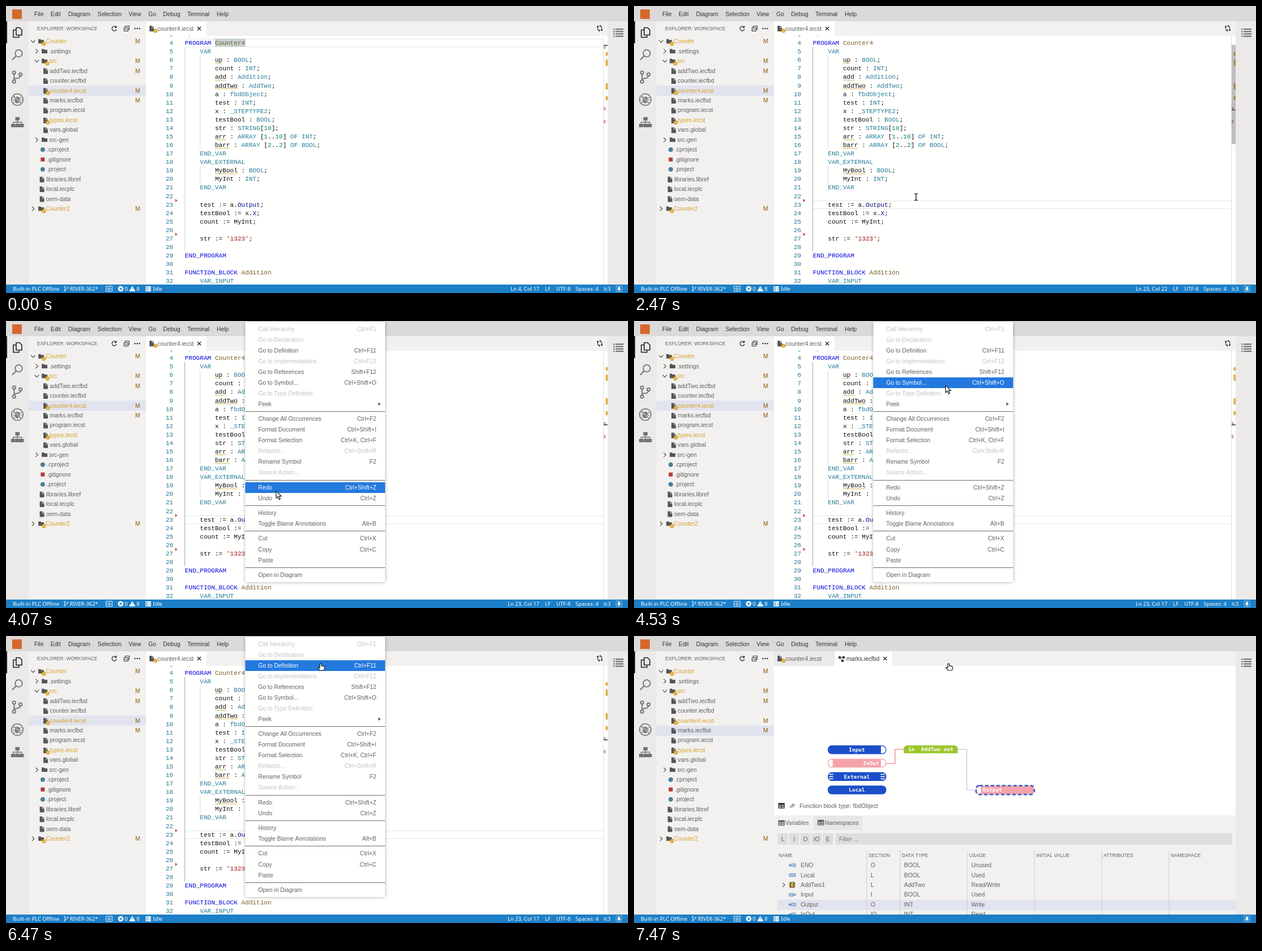
An HTML page with a canvas that plays this animation: 1101x509 px, repeating every 8 s.

```html
<!DOCTYPE html>
<html lang="en">
<head>
<meta charset="utf-8">
<title>Code editor: go to definition</title>
<style>
html, body { margin: 0; width: 100%; height: 100%; overflow: hidden; background: #fffffe; }
canvas { display: block; }
</style>
</head>
<body>
<canvas id="stage" width="1101" height="509"></canvas>
<script>
const ctx = document.getElementById('stage').getContext('2d');
const LOOP = 8000;
const SANS = '"Liberation Sans", Arial, sans-serif';
const CODE = '11.11px "Liberation Mono", monospace';
const UI = '10.32px ' + SANS;
const SMALL = '8.6px ' + SANS;
const STATUS = '9.4px "Noto Sans", "Open Sans", sans-serif';
const NODE = 'bold 9.52px "DejaVu Sans Mono", monospace';
const CHAR = 6.667, LINE = 15.08, ROW = 17.46, CODE_X = 316.6;
const GREY = '#616161', DARK = '#333', GOLD = '#d6a12a', BROWN = '#895503';
const PANEL = '#f2f1f0', BAR = '#ebeae9', SELECTED = '#e1e4ee', WHITE = '#fffffe';

// Drawing helpers
function rect(x, y, w, h, color) {
  ctx.fillStyle = color;
  ctx.fillRect(x, y, w, h);
}
function text(s, x, y, color = GREY, font = UI, align = 'left') {
  ctx.font = font;
  ctx.fillStyle = color;
  ctx.textAlign = align;
  ctx.fillText(s, x, y + parseFloat(font.replace('bold ', '')) * 0.345);
}
function fill(d, x, y, color) {
  ctx.save();
  ctx.translate(x, y);
  ctx.fillStyle = color;
  ctx.fill(new Path2D(d));
  ctx.restore();
}
function stroke(d, x, y, color, width = 1) {
  ctx.save();
  ctx.translate(x, y);
  ctx.strokeStyle = color;
  ctx.lineWidth = width;
  ctx.stroke(new Path2D(d));
  ctx.restore();
}
function disc(x, y, r, color) {
  ctx.fillStyle = color;
  ctx.beginPath();
  ctx.arc(x, y, r, 0, 7);
  ctx.fill();
}
function ring(x, y, r, color, width = 1) {
  ctx.strokeStyle = color;
  ctx.lineWidth = width;
  ctx.beginPath();
  ctx.arc(x, y, r, 0, 7);
  ctx.stroke();
}
function round(x, y, w, h, r, color) {
  ctx.fillStyle = color;
  ctx.beginPath();
  ctx.roundRect(x, y, w, h, r);
  ctx.fill();
}
function shadowBox(x, y, w, h, color) {
  ctx.save();
  ctx.shadowColor = 'rgba(0,0,0,.35)';
  ctx.shadowBlur = 6;
  rect(x, y, w, h, color);
  ctx.restore();
}
function clipped(x, y, w, h, draw) {
  ctx.save();
  ctx.beginPath();
  ctx.rect(x, y, w, h);
  ctx.clip();
  draw();
  ctx.restore();
}

// Icons
const cross = (x, y) => stroke('M-3-3L3 3M3-3L-3 3', x, y, '#222', 1.4);
function fileIcon(x, y) {
  fill('M-4-5h5l3 3v7h-8z', x, y, '#555');
  stroke('M.7-5v3.3h3.3', x, y, '#eee', .8);
}
const folderIcon = (x, y) => fill('M-5-4h4l1.3 1.5h4.7v6.3h-10z', x, y, '#555');
function badge(x, y) {
  disc(x, y, 3.6, '#dda526');
  stroke('M-1.5 0l1 1.3L1.6-1.4', x, y, '#fff4d8', .9);
}
function chevron(x, y, open) {
  stroke(open ? 'M-3.8-2L0 2L3.8-2' : 'M-2-3.8L2 0L-2 3.8', x, y, '#444', 1.1);
}
function infoIcon(x, y) {
  disc(x, y, 5.4, '#76bdec');
  rect(x - .7, y - .8, 1.5, 3.8, '#fff');
  rect(x - .7, y - 3.2, 1.5, 1.4, '#fff');
}
function branchIcon(x, y, s, color) {
  for (const [dx, dy] of [[-3, -4.2], [3, -2.5], [-3, 4.2]]) ring(x + dx * s, y + dy * s, 1.4 * s, color, s);
  stroke(`M${-3 * s} ${-2.6 * s}V${2.6 * s}M${3 * s}${-1 * s}Q${3 * s} ${1.4 * s} ${-3 * s} ${1.6 * s}`, x, y, color, s);
}
function tableIcon(x, y, color) {
  stroke('M-5-4.2h10v8.4h-10zM-5-1.4h10M-5 1.4h10M0-3v7', x, y, color, 1.2);
  rect(x - 5, y - 4.5, 10, 2, color);
}
function eraserIcon(x, y) {
  fill('M-5 1.5L1-4.5L5-1L-.5 4h-3z', x, y, '#aaa');
  stroke('M-2.5-1L1.5 3M-3 4h8', x, y, '#fff', .9);
}

// Window frame
function titleBar() {
  rect(0, 0, 1101, 27, '#dbdad9');
  rect(11, 6, 17, 17, '#d5682e');
  const items = { File: 50, Edit: 79, Diagram: 110, Selection: 162, View: 217, Go: 252, Debug: 278, Terminal: 321, Help: 373 };
  for (const name in items) text(name, items[name], 14, DARK);
}
function activityBar() {
  const c = '#727272';
  rect(0, 27, 40, 467, BAR);
  rect(0, 27, 2, 39, '#222');
  stroke('M-2-8h6l4 4v9h-10zM-2-4h-5v13h10v-3', 20, 46.5, '#1e1e1e', 1.6);
  ring(22.5, 84, 6.3, c, 1.8);
  stroke('M0 0L-7 7', 18, 88.5, c, 2.2);
  branchIcon(20, 126, 1.9, c);
  ring(20, 166, 10.2, c, 1.6);
  fill('M-4-3Q0-9 4-3V3Q0 9-4 3z', 20, 166.5, c);
  stroke('M-7-4l3 2M7-4l-3 2M-8 1h16M-7 6l3-2M7 6l-3-2', 20, 166, c, 1.2);
  stroke('M-7-7L7 7', 20, 166, BAR, 3);
  stroke('M-7-7L7 7', 20, 166, c, 1.5);
  for (const [x, y] of [[16.5, 197], [9, 209], [16.5, 209], [24, 209]]) rect(x, y, 7.5, 6, c);
  stroke('M0-5v9M-7.5 4V0h15v4', 20.2, 206, c, 1.3);
  rect(1065, 27, 36, 467, BAR);
  for (let i = 0; i < 4; i++) {
    rect(1075, 40 + i * 4.2, 2.5, 2.2, c);
    rect(1079, 40 + i * 4.2, 14, 2.2, c);
  }
}

// Rows: name, text x, kind, flags (w = warning, m = modified)
const TREE = [
  ['Counter', 70.5, 'open', 'wm'], ['.settings', 76.5, 'closed', ''], ['src', 76.5, 'open', 'wm'],
  ['addTwo.iecfbd', 77.5, 'file', 'm'], ['counter.iecfbd', 77.5, 'file', ''], ['counter4.iecst', 77.5, 'file', 'wm'],
  ['marks.iecfbd', 77.5, 'file', 'm'], ['program.iecst', 77.5, 'file', ''], ['types.iecst', 77.5, 'file', 'w'],
  ['vars.global', 77.5, 'file', ''], ['src-gen', 76.5, 'closed', ''], ['.cproject', 72.5, 'disc', ''],
  ['.gitignore', 72.5, 'square', ''], ['.project', 72.5, 'disc', ''], ['libraries.libref', 71, 'file', ''],
  ['local.iecplc', 71, 'file', ''], ['oem-data', 71, 'file', ''], ['Counter2', 70.5, 'closed', 'wm']
];
function sidebar(active) {
  rect(40, 27, 208, 467, PANEL);
  text('EXPLORER: WORKSPACE', 55, 40, GREY, SMALL);
  stroke('M3.2-2.6A4 4 0 1 0 4 1M3.8-5v3h-3', 191.5, 40, DARK, 1.3);
  stroke('M-4-1.5h7v6h-7zM-2-2v-2.5h7v6h-2M-2.5 1.5h4', 213, 40, DARK, 1.1);
  for (let i = 0; i < 3; i++) disc(228.3 + i * 4, 40, 1.3, DARK);
  TREE.forEach(([name, x, kind, flags], i) => {
    const y = 62.7 + i * ROW, warn = flags.includes('w');
    if (name === active) rect(40, Math.round(y - 8.7), 207, 18, SELECTED);
    if (kind === 'file') fileIcon(x - 7.3, y + .5);
    else if (kind === 'disc') disc(65, y, 4, '#4a7f96');
    else if (kind === 'square') rect(61.5, y - 3.5, 7, 7, '#ad3d38');
    else {
      folderIcon(x - 8.3, y);
      chevron(x > 75 ? 54.5 : 48, y, kind === 'open');
    }
    if (warn) badge(x - 3.4, y + 4.2);
    text(name, x, y, warn ? GOLD : GREY);
    if (flags.includes('m')) text('M', 233, y, BROWN, UI, 'center');
  });
}
function statusBar(position, notices) {
  const put = (s, x, align) => text(s, x, 501.6, '#fff', STATUS, align);
  rect(0, 494, 1101, 15, '#1c7fc7');
  put('Built-in PLC Offline', 12);
  branchIcon(106.5, 501.5, .8, '#fff');
  put('RIVER-362*', 113);
  stroke('M-5.5-4.5h11v9h-11zM-2.5 1.5Q-5 0-2-1Q0-4 2-1Q5 0 2.5 1.5M0 4V0M-1.5 1.3L0 0L1.5 1.3', 182.5, 501.5, '#fff', .9);
  disc(203, 501.5, 4.8, '#fff');
  stroke('M-2-2L2 2M2-2L-2 2', 203, 501.5, '#1c7fc7', 1.3);
  put('0', 210);
  fill('M0-5L5.5 4.5h-11z', 223.5, 501.5, '#fff');
  rect(223, 499.5, 1, 3.2, '#1c7fc7');
  put('8', 231);
  for (let i = 0; i < 3; i++) rect(247, 497 + i * 3.3, 9.5, 2.6, '#fff');
  rect(249, 497, .8, 9, '#1c7fc7');
  put('Idle', 260);
  if (position) {
    put(position, 944, 'right');
    put('LF', 954);
    put('UTF-8', 974);
    put('Spaces: 4', 1008);
    put('lc3', 1058);
  }
  const x = notices ? 1079.5 : 1085;
  stroke('M-5-5h10v10h-10z', x, 501.5, '#a9cfeb', .8);
  fill('M-3.5 2Q-2 1-2-1Q-2-3.7 0-3.7Q2-3.7 2-1Q2 1 3.5 2zM-1 2.7h2v1h-2z', x, 501.5, '#fff');
  if (notices) put('1', 1088);
}
function tabs(diagram) {
  rect(248, 27, 817, 26, PANEL);
  rect(248, 27, 107, 26, diagram ? BAR : WHITE);
  fileIcon(258, 40);
  badge(264.5, 44);
  text('counter4.iecst', 268, 40);
  if (!diagram) {
    cross(342, 40);
    stroke('M-3.5-2v3Q-3.5 4 0 4M3.5 2v-3Q3.5-4 0-4M1.5-5.5L0-4L1.5-2.5M-1.5 2.5L0 4L-1.5 5.5', 1051, 39.5, DARK, 1.2);
    disc(1047.5, 36.5, 1.6, DARK);
    disc(1054.5, 42.5, 1.6, DARK);
    return;
  }
  rect(355.5, 27, 101.5, 26, WHITE);
  rect(362, 36, 4, 4, DARK);
  rect(369, 36, 4, 4, DARK);
  rect(367, 42, 4, 4, DARK);
  stroke('M-3-2H3M-2-1L2 4', 367, 40, DARK, 1);
  text('marks.iecfbd', 376, 40, DARK);
  cross(444.5, 40);
}

// Code editor
const SOURCE = `*/
PROGRAM Counter4
    VAR
        up : BOOL;
        count : INT;
        add : Addition;
        addTwo : AddTwo;
        a : fbdObject;
        test : INT;
        x : _STEPTYPE2;
        testBool : BOOL;
        str : STRING[10];
        arr : ARRAY [1..10] OF INT;
        barr : ARRAY [2..2] OF BOOL;
    END_VAR
    VAR_EXTERNAL
        MyBool : BOOL;
        MyInt : INT;
    END_VAR

    test := a.Output;
    testBool := x.X;
    count := MyInt;

    str := '1323';

END_PROGRAM

FUNCTION_BLOCK Addition
    VAR_INPUT`.split('\n');
const TOKEN = /'[^']*'|(?<=\.)[A-Za-z]\w*|\w+|[^\s\w]/g;
const MARKED = /^ +(up|add|addTwo|arr|barr|MyBool) :/;
const lineY = n => 65.3 + (n - 4) * LINE;

function tokenColor(word, line, at) {
  if (/^((END_)?PROGRAM|FUNCTION_BLOCK)$/.test(word)) return '#0808e0';
  if (word[0] === "'") return '#a31515';
  if (/^\d+$/.test(word)) return '#098658';
  if (line[at - 1] === '.' && /^[A-Z]/.test(word)) return '#001080';
  if (/^(PROGRAM|FUNCTION)/.test(line)) return '#795e26';
  if (/^(VAR|END_VAR)/.test(word)) return '#267f99';
  return /: /.test(line.slice(0, at)) && /\w/.test(word) ? '#267f99' : '#111';
}
function squiggle(x, y, w) {
  let d = 'M0 0';
  for (let i = 1; i * 2 <= w; i++) d += `L${i * 2} ${i % 2 ? -2 : 0}`;
  stroke(d, x, y, '#c99a2c', .9);
}
function code(current) {
  const top = Math.round(lineY(current) - LINE / 2 + .4);
  rect(CODE_X, top, 741, 1, '#e4e4e3');
  rect(CODE_X, top + 14, 741, 1, '#e4e4e3');
  if (current === 4) rect(370, 58, 54, 14, '#c7d2d4');
  rect(316, lineY(5) - 7.5, 1, LINE * 24, current === 4 ? '#d6d6d5' : '#a5a5a4');
  rect(343, lineY(6) - 7.5, 1, LINE * 11, '#d6d6d5');
  rect(343, lineY(19) - 7.5, 1, LINE * 2, '#d6d6d5');
  SOURCE.forEach((line, i) => {
    const y = lineY(i + 3);
    text(i + 3, 296, y, '#237893', CODE, 'right');
    for (const m of line.matchAll(TOKEN)) {
      text(m[0], CODE_X + m.index * CHAR, y, i ? tokenColor(m[0], line, m.index) : '#008000', CODE);
    }
    const mark = line.match(MARKED);
    if (mark) squiggle(370, y + 7, mark[1].length * CHAR);
  });
  for (const y of [345, 405]) fill('M-1.5-3L2.5 0L-1.5 3z', 301, y, '#cf4747');
}
function ruler(current, sliderAlpha) {
  rect(1057, 53, 1, 441, '#dddddc');
  if (current === 4) rect(1058, 71, 3.5, 5, '#b9b7b9');
  for (const [y, h] of [[82, 6], [95, 11], [137, 11], [160, 7]]) rect(1061.5, y, 3.5, h, '#e0ac3c');
  for (const y of [179, 202]) rect(1058, y, 3.5, 6, '#d6a5ab');
  rect(1058, current === 4 ? 69 : 183.5, 7, 1.5, '#3a3340');
  rect(1058, 69, 7, 176, `rgba(100,100,100,${.42 * sliderAlpha})`);
}
function editor(t) {
  const current = t < 1600 ? 4 : 23;
  rect(248, 53, 817, 441, WHITE);
  clipped(248, 52, 809, 442, () => code(current));
  ruler(current, t < 2000 ? ramp(t, 470, 600) : 1 - ramp(t, 3270, 4070));
  if ((t >= 1600 && t < 2130) || (t >= 2670 && t < 3270)) rect(456.3, 345, 1.6, 15, '#111');
}

// Context menu; "-" is a separator, a leading "!" marks a disabled entry
const MENU = `!Call Hierarchy|Ctrl+F1
!Go to Declaration|
Go to Definition|Ctrl+F11
!Go to Implementations|Ctrl+F12
Go to References|Shift+F12
Go to Symbol...|Ctrl+Shift+O
!Go to Type Definition|
Peek|>
-
Change All Occurrences|Ctrl+F2
Format Document|Ctrl+Shift+I
Format Selection|Ctrl+K, Ctrl+F
!Refactor...|Ctrl+Shift+R
Rename Symbol|F2
!Source Action...|
-
Redo|Ctrl+Shift+Z
Undo|Ctrl+Z
-
History|
Toggle Blame Annotations|Alt+B
-
Cut|Ctrl+X
Copy|Ctrl+C
Paste|
-
Open in Diagram|`.split('\n');
function menu(pointer) {
  shadowBox(423.5, 1.5, 247.5, 461.5, WHITE);
  let y = 14;
  for (const entry of MENU) {
    if (entry === '-') {
      rect(423.5, Math.round(y - 6.3), 247.5, 1, '#6c6c6c');
      y += 7.25;
      continue;
    }
    const off = entry[0] === '!';
    const [label, keys] = entry.replace('!', '').split('|');
    const over = !off && pointer.x > 425 && Math.abs(pointer.y - y) < 9.5;
    if (over) rect(423.5, Math.round(y - 9.3), 247.5, 19, '#2479df');
    const color = over ? '#fff' : off ? '#c2c2c2' : GREY;
    text(label, 446.5, y, color);
    if (keys === '>') fill('M-2-3L2.5 0L-2 3z', 661, y, color);
    else text(keys, 655.5, y, color, UI, 'right');
    y += 19.05;
  }
}

// Diagram editor
const BLUE = '#1b4fc8', PINK = '#f5a3aa';
function pill(y, color, label, x, left, right) {
  round(343, y, 103.5, 15.5, 7, color);
  if (left) round(344.2, y + 1.2, 7.5, 13.1, [6, 0, 0, 6], '#fff');
  if (right) round(437.2, y + 1.2, 8, 13.1, [0, 6, 6, 0], '#fff');
  text(label, x, y + 7.8, '#fff', NODE, 'center');
}
function diagram(selected) {
  stroke('M446 226H462V201H478', 0, 0, '#ee9ba4', 1.6);
  stroke('M573 201H589V273H606', 0, 0, '#cfd3ea', 1.6);
  pill(194, BLUE, 'Input', 394.5, false, true);
  pill(217.8, PINK, 'InOut', 419.5, true, true);
  pill(241.5, BLUE, 'External', 394.5);
  for (const x of [345, 436.5]) for (let i = 0; i < 3; i++) rect(x, 244.5 + i * 4, 7.5, 1.6, '#fff');
  pill(265.3, BLUE, 'Local', 394.5);
  round(477.5, 194, 95.5, 14, [6, 6, 0, 0], '#9bc62c');
  text('in  AddTwo out', 525.3, 201, '#fff', NODE, 'center');
  round(605.5, 265.5, 103, 15.5, 6, PINK);
  round(606.5, 267, 7.5, 12.5, [5, 0, 0, 5], '#fff');
  text('Output', 617, 273, '#fff', NODE);
  if (selected) {
    ctx.setLineDash([6, 4]);
    ctx.strokeStyle = '#3d5fcf';
    ctx.lineWidth = 2.8;
    ctx.beginPath();
    ctx.roundRect(605.5, 265.3, 103, 15.9, 6);
    ctx.stroke();
    ctx.setLineDash([]);
  }
}
const COLUMNS = { NAME: 256, SECTION: 415, 'DATA TYPE': 474, USAGE: 593, 'INITIAL VALUE': 712, ATTRIBUTES: 831, NAMESPACE: 950 };
const VARIABLES = [
  ['ENO', 'O', 'BOOL', 'Unused'], ['Local', 'L', 'BOOL', 'Used'], ['AddTwo1', 'L', 'AddTwo', 'Read/Write'],
  ['Input', 'I', 'BOOL', 'Used'], ['Output', 'O', 'INT', 'Write'], ['InOut', 'IO', 'INT', 'Read']
];
function variableIcon(row, y) {
  if (row[2] === 'AddTwo') {
    chevron(265, y, false);
    stroke('M-6-3h12M-6 0h12M-6 3h12', 280, y, '#6b5a2c', 1);
    rect(276, y - 5, 8, 10, '#6b5420');
    rect(278, y - 3.5, 4, 7, '#e6c766');
    rect(279, y - .6, 3, 1.2, '#6b5420');
    return;
  }
  const input = row[1] === 'I', local = row[1] === 'L';
  const x = input ? 274.5 : local ? 275 : 278.5, w = local ? 11 : 7.5;
  rect(x, y - 2.5, w, 5, '#a9c6ee');
  stroke(`M0 0h${w}v5h${-w}z`, x, y - 2.5, '#6787b8', .9);
  if (!local) stroke(input ? 'M0 0h4M2-2L4.5 0L2 2' : 'M0 0h-4M-2-2L-4.5 0L-2 2', input ? 282 : 278.5, y, '#4a5f80', 1);
}
function variables(filled, selected) {
  rect(248, 318, 817, 176, PANEL);
  rect(318, 319, 86, 25, '#e7e6e5');
  tableIcon(261, 331.5, '#555');
  text('Variables', 267.5, 331.5);
  tableIcon(330.5, 331, '#555');
  text('Namespaces', 337.5, 331);
  ['L', 'I', 'O', 'IO', 'E'].forEach((s, i) => {
    const x = 254.5 + i * 19.9;
    rect(x, 350, 18, 20, '#dfdedd');
    text(s, x + 9, 360, GREY, UI, 'center');
  });
  rect(357, 350, 702, 20, '#dfdedd');
  text('Filter ...', 363, 360, '#777');
  for (const name in COLUMNS) text(name, COLUMNS[name], 389, GREY, SMALL);
  if (filled) {
    VARIABLES.forEach((row, i) => {
      const y = 406.5 + i * ROW;
      if (selected && row[0] === 'Output') rect(254, Math.round(y - 8.7), 811, 18, SELECTED);
      variableIcon(row, y);
      row.forEach((s, c) => text(s, [295, 419, 478, 597][c], y));
    });
  }
  for (const x of Object.values(COLUMNS).slice(1)) rect(x - 3.5, 380, 1, 114, '#cfcecd');
}
function diagramEditor(t) {
  const ready = t >= 7130;
  rect(248, 53, 817, 441, WHITE);
  const y = ready ? 301 : 480;
  if (!ready) infoIcon(260.5, 62);
  tableIcon(261, y, '#222');
  eraserIcon(280.5, y);
  if (ready) {
    text('Function block type: fbdObject', 293, 301);
    variables(t >= 7330, t >= 7470);
  }
  if (t >= 7330) diagram(t >= 7470);
}
function notification() {
  shadowBox(696, 445.5, 396.5, 35.5, PANEL);
  infoIcon(709, 463);
  text('Model loading in progress!', 726, 463);
  cross(1078, 463);
}

// Pointer: time, x, y
const PATH = [
  [470, 1046, 38], [730, 808, 177], [805, 808, 177], [930, 700, 288], [1005, 700, 288], [1130, 586, 332],
  [1205, 586, 332], [1395, 516, 351], [2265, 516, 351], [2330, 516.4, 344], [2405, 516.4, 344], [2530, 484, 334],
  [2605, 484, 334], [2730, 432, 347], [2805, 432, 347], [2870, 426, 350], [3265, 426, 350], [3270, 424, 347.5],
  [3860, 424, 347.5], [4070, 478, 302], [4530, 551.5, 114.5], [4930, 555, 51], [5000, 557, 49]
];
const BEAM = 'M-3-6Q0-6 0-4.5Q0-6 3-6M0-5V5M-3 6Q0 6 0 4.5Q0 6 3 6';
const ARROW = 'M0 0V12.6L3 9.9L5.2 14.8L7.4 13.8L5.3 9.1H9.2z';
const HAND = 'M-1.5 6V.8Q0-1 1.3.8V4Q3 3 3.8 4.4Q5.4 4 5.8 5.2Q7 5.3 7 6.6V9L5.6 12H-1.2L-4.8 7.6Q-4.6 5.6-1.5 7.5z';
function ramp(t, from, to) {
  return Math.min(1, Math.max(0, (t - from) / (to - from)));
}
function pointerAt(t) {
  const i = PATH.findIndex(p => p[0] > t);
  if (i < 0) return { x: 557, y: 49 };
  if (i === 0) return null;
  const [a, b] = [PATH[i - 1], PATH[i]], k = ramp(t, a[0], b[0]);
  return { x: a[1] + (b[1] - a[1]) * k, y: a[2] + (b[2] - a[2]) * k };
}
function drawPointer(t, { x, y }) {
  if (t < 3270) {
    stroke(BEAM, x, y, '#fff', 2.6);
    stroke(BEAM, x, y, '#111', 1.3);
    return;
  }
  const shape = t < 5000 ? ARROW : HAND;
  fill(shape, x, y, '#fff');
  stroke(shape, x, y, '#1a1a1a', 1.2);
}

function draw(t) {
  const inDiagram = t >= 6600;
  const pointer = pointerAt(t);
  editor(t);
  tabs(inDiagram);
  if (inDiagram) diagramEditor(t);
  titleBar();
  activityBar();
  sidebar(t < 6670 ? 'counter4.iecst' : 'marks.iecfbd');
  const notice = t >= 6670 && t < 7270;
  const position = t < 1600 ? 'Ln 4, Col 17' : t < 3270 ? 'Ln 23, Col 22' : 'Ln 23, Col 17';
  statusBar(inDiagram ? '' : position, notice);
  if (notice) notification();
  if (t >= 3270 && t < 6530) menu(pointer);
  if (pointer) drawPointer(t, pointer);
}
function tick() {
  draw(performance.now() % LOOP);
  requestAnimationFrame(tick);
}
tick();
</script>
</body>
</html>
```
